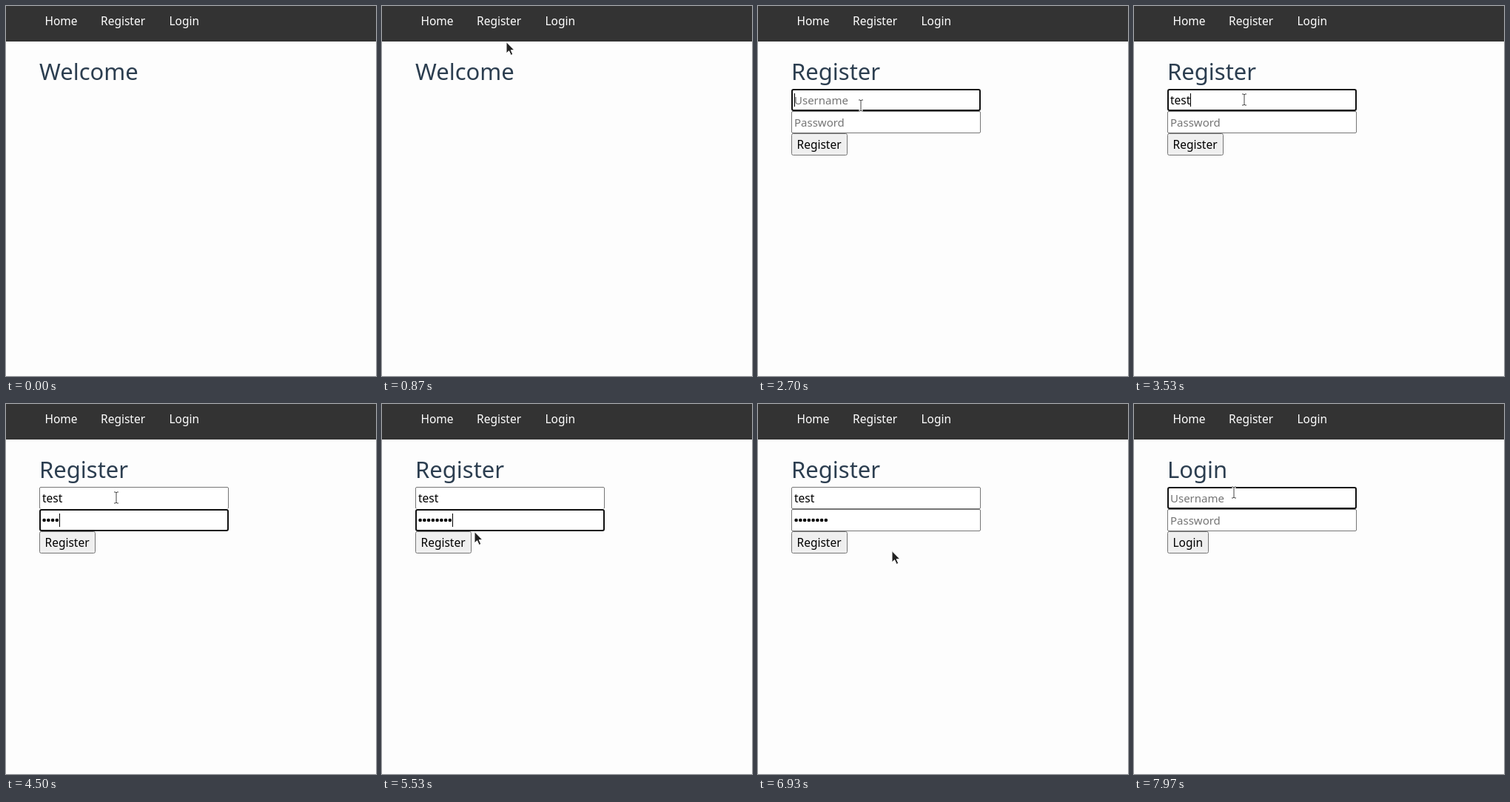
Animation of 500x500 px, one loop 8000 ms. Source, as an HTML page:

```html
<!DOCTYPE html>
<html lang="en">
<head>
<meta charset="utf-8">
<title>Register and log in</title>
<style>
  html, body { margin: 0; width: 100%; height: 100%; overflow: hidden; background: #fdfdfd; }
  svg { display: block; width: 100%; height: 100%; }
  text { font: 15.5px "Noto Sans", "Open Sans", sans-serif; fill: #000; white-space: pre; }
  .nav text { fill: #fff; }
  .nav rect { fill: #f00; }
  #title { font-size: 31px; fill: #2c3e50; }
  .box { fill: #fff; stroke: #767676; }
  text.hint { font-size: 15px; fill: #757575; }
  .halo { fill: none; stroke: #fff; stroke-width: 4; }
  .line { fill: none; stroke: #101010; stroke-width: 2; }
  #button { fill: #efefef; stroke: #767676; }
  #button.over { fill: #e5e5e5; stroke: #4f4f4f; }
  #button.down { fill: #f5f5f5; stroke: #8d8d8d; }
  #pointer path { fill: #222; stroke: #fff; stroke-linejoin: round; }
  #pointer #beam { fill: none; stroke: #444; }
  #pointer #glow { fill: none; stroke: #fff; stroke-width: 3; }
</style>
</head>
<body>
<svg viewBox="0 0 500 500">
  <rect width="500" height="500" fill="#fdfdfd"/>
  <rect width="500" height="48" fill="#333"/>
  <g class="nav">
    <rect x="45" width="59" height="48"/><text x="52.5" y="26">Home</text>
    <rect x="120" width="77" height="48"/><text x="128" y="26">Register</text>
    <rect x="213" width="55" height="48"/><text x="220.5" y="26">Login</text>
  </g>
  <text id="title" x="45" y="100"></text>
  <g id="form">
    <rect class="box" x="45.5" y="112.5" width="255" height="29" rx="1.5"/>
    <g id="userRing">
      <rect class="halo" x="46" y="113" width="254" height="28" rx="2"/>
      <rect class="line" x="46" y="113" width="254" height="28" rx="2"/>
    </g>
    <rect class="box" x="45.5" y="142.5" width="255" height="29" rx="1.5"/>
    <use id="passRing" href="#userRing" y="30"/>
    <text id="user" x="49" y="133"></text>
    <text id="pass" class="hint" x="49" y="163">Password</text>
    <g id="dots"></g>
    <rect id="button" x="45.5" y="172.5" height="29" rx="2"/>
    <text id="label" x="52.5" y="193"></text>
    <rect id="caret" width="1" height="18"/>
  </g>
  <g id="pointer">
    <path id="arrow" d="M0 0V15.5L3.6 12.2L6.2 18L8.8 16.8L6.2 11.2H11Z"/>
    <path id="hand" d="M-1.6 1Q0-1 1.6 1V6L9 8Q11 8.6 10.8 11L10 14.5V17H1V15L-4.6 9.5Q-4.6 7-1.6 8.8Z"/>
    <g id="ibeam">
      <path id="glow" d="M-3-7.5H3M0-7.5V7.5M-3 7.5H3"/>
      <path id="beam" d="M-3-7.5H-1L0-6.5L1-7.5H3M0-6.5V6.5M-3 7.5H-1L0 6.5L1 7.5H3"/>
    </g>
  </g>
</svg>
<script>
const LOOP = 8000, MOVE = 400;
const $ = id => document.getElementById(id);
const show = (el, on) => el.style.display = on ? "" : "none";

// Pointer stops: arrival time, x, y. It rests, then takes at most MOVE ms to the next one.
const stops = [
  [30, 80, -22], [160, 80, 24], [460, 242, 24], [640, 212, 92], [850, 168, 48],
  [1450, 164, 37], [1920, 142, 172], [2120, 160, 32], [2480, 203, 18], [2690, 139, 134],
  [3180, 149, 126], [5450, 125, 172], [6060, 107, 192], [6600, 191, 200],
  [7250, 94, 180], [7940, 135, 119]
];
const T = { register: 1250, press: 2130, reload: 2230, type: 3110, tab: 3560,
  secret: 4060, submit: 6080, release: 6240, login: 7050 };
const DOT = 5.75, NAME = "test", SECRET = 8;
const keys = (from, gap, n) => Array.from({ length: n }, (_, i) => from + i * gap);
const userKeys = keys(T.type, 110, NAME.length);
const passKeys = keys(T.secret, 145, SECRET);
const resets = [T.register, T.reload, ...userKeys, T.tab, ...passKeys, T.login];
const links = [...document.querySelectorAll(".nav rect")];

for (let i = 0; i < SECRET; i++) {
  const dot = document.createElementNS("http://www.w3.org/2000/svg", "circle");
  dot.setAttribute("cx", 51.6 + DOT * i);
  dot.setAttribute("cy", 157);
  dot.setAttribute("r", 2.3);
  $("dots").append(dot);
}

function pointerAt(t) {
  const next = stops.findIndex(s => s[0] > t);
  if (next === 0) return stops[0].slice(1);
  if (next < 0) return stops.at(-1).slice(1);
  const [t0, x0, y0] = stops[next - 1], [t1, x1, y1] = stops[next];
  const span = Math.min(MOVE, t1 - t0);
  const u = Math.max(0, 1 - (t1 - t) / span), e = u * u * (3 - 2 * u);
  return [x0 + (x1 - x0) * e, y0 + (y1 - y0) * e];
}

const within = (x, y, l, t, r, b) => x >= l && x < r && y >= t && y < b;
const typed = (list, t) => list.filter(k => k <= t).length;

function drawForm(t, x, y, page) {
  const fresh = page === "Login";
  const n = fresh ? 0 : typed(userKeys, t);
  const m = fresh ? 0 : typed(passKeys, t);
  $("user").textContent = n ? NAME.slice(0, n) : "Username";
  $("user").classList.toggle("hint", !n);
  show($("pass"), !m);
  [...$("dots").children].forEach((d, i) => show(d, i < m));

  const width = fresh ? 56 : 76;
  $("button").setAttribute("width", width - 1);
  $("button").classList.toggle("over", within(x, y, 45, 172, 45 + width, 202));
  $("button").classList.toggle("down", t >= T.submit && t < T.release);
  $("label").textContent = page;

  const second = !fresh && t >= T.tab;
  const blurred = (t >= T.press && t < T.reload) || (t >= T.submit && !fresh);
  $("userRing").style.visibility = "inherit";
  $("userRing").setAttribute("opacity", 1);
  drawRing(blurred ? -1 : second ? 1 : 0);

  // The caret starts a new blink with each key or change of focus
  const last = Math.max(...resets.filter(r => r <= t));
  show($("caret"), !blurred && (t - last) % 1000 < 500);
  const end = second ? DOT * m : n ? $("user").getComputedTextLength() : 0;
  $("caret").setAttribute("x", Math.round(49 + end));
  $("caret").setAttribute("y", second ? 148 : 118);
}

// One ring element moves between the fields, and lies under the lower box in the upper one
function drawRing(field) {
  show($("userRing"), field === 0);
  show($("passRing"), field === 1);
}

function render(t) {
  const [x, y] = pointerAt(t);
  const page = t < T.register ? "Welcome" : t < T.login ? "Register" : "Login";
  $("title").textContent = page;
  const hover = links.find(r => within(x, y, r.x.baseVal.value, 0, r.x.baseVal.value + r.width.baseVal.value, 48));
  links.forEach(r => show(r, r === hover));

  const hasForm = page !== "Welcome";
  show($("form"), hasForm);
  if (hasForm) drawForm(t, x, y, page);

  const inText = hasForm && within(x, y, 45, 112, 301, 172) ||
    within(x, y, 45, 72, 45 + $("title").getComputedTextLength(), 108);
  const kind = hover ? "hand" : inText ? "ibeam" : "arrow";
  for (const k of ["arrow", "hand", "ibeam"]) show($(k), k === kind);
  $("pointer").setAttribute("transform", `translate(${Math.round(x)} ${Math.round(y) + 0.5})`);
}

// Both rings share one drawing, kept apart so that each can be hidden alone
const ring = $("userRing"), copy = ring.cloneNode(true);
copy.id = "passRing";
copy.setAttribute("transform", "translate(0 30)");
$("passRing").replaceWith(copy);

const start = performance.now();
function tick() {
  render((performance.now() - start) % LOOP);
  requestAnimationFrame(tick);
}
tick();
</script>
</body>
</html>
```
